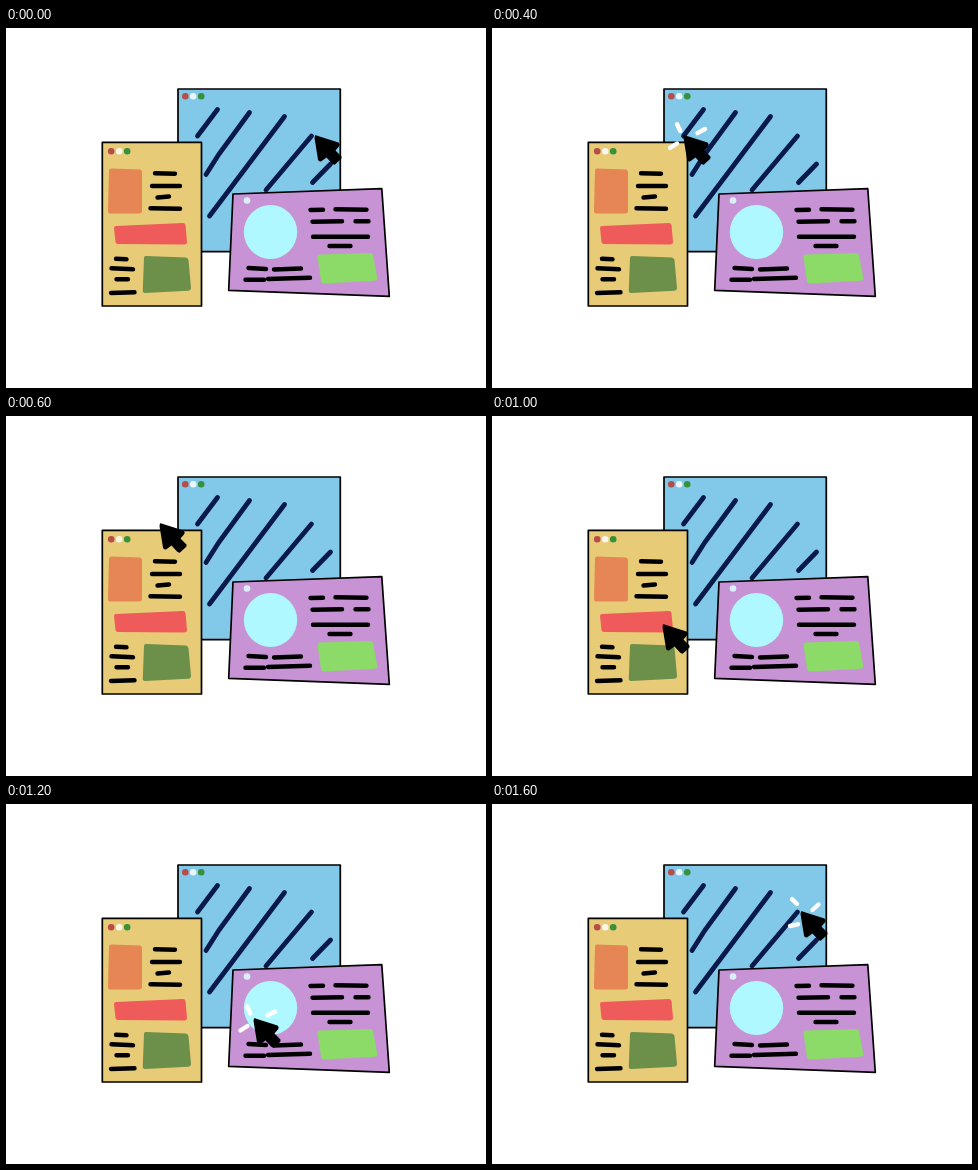
An HTML page that plays this animation: 480 by 360 pixels, repeating every 1.8 s.

```html
<!DOCTYPE html>
<html lang="en">
<head>
<meta charset="utf-8">
<title>Clicking through windows</title>
<style>
  html, body { margin: 0; width: 100%; height: 100%; overflow: hidden; background: #fff; }
  svg { display: block; width: 100vw; height: 100vh; }
  .frame { stroke: #000; stroke-width: 1.7; stroke-linejoin: round; }
  .ink { fill: none; stroke: #000; stroke-width: 4.4; stroke-linecap: round; }
  .glare { stroke: #08194a; stroke-width: 4.8; }
  .click { stroke: #fff; opacity: 0; animation: click 1.8s step-end infinite; }
  .cursor { animation: hop 1.8s step-end infinite; }

  @keyframes hop {
    0%, 88.88% { transform: translate(308px, 107px); }
    11.11% { transform: translate(248px, 107px); }
    22.22% { transform: translate(191px, 107px); }
    33.33% { transform: translate(153px, 107px); }
    44.44% { transform: translate(139px, 151px); }
    55.55% { transform: translate(170px, 208px); }
    66.66% { transform: translate(247px, 214px); }
    77.77% { transform: translate(289px, 180px); }
    100% { transform: translate(308px, 107px); }
  }
  @keyframes click {
    0% { opacity: 1; }
    11.11%, 100% { opacity: 0; }
  }
</style>
</head>
<body>
<svg viewBox="0 0 480 360">
  <g id="blue">
    <path class="frame" fill="#82c8e8" d="M172 61H334.3V223.7H172Z"/>
    <circle cx="179.3" cy="68.3" r="3.3" fill="#b84c48"/>
    <circle cx="187.2" cy="68.3" r="3.3" fill="#e8f7ff"/>
    <circle cx="195.2" cy="68.3" r="3.3" fill="#37913a"/>
    <path class="ink glare" d="M211.5 81.5L191.5 108M243.5 84.5L213 126L200 146.5M278.5 88.5L203.5 188M305.5 108L260 162M324.5 136L306.5 154.5"/>
  </g>

  <g id="yellow">
    <path class="frame" fill="#e7cb77" d="M96.3 114.3H195.5V278H96.3Z"/>
    <circle cx="105.2" cy="123.3" r="3.3" fill="#b84c48"/>
    <circle cx="113.2" cy="123.3" r="3.3" fill="#fbf6ea"/>
    <circle cx="121.2" cy="123.3" r="3.3" fill="#37913a"/>
    <path fill="#e58654" d="M105 140.5L134 141.5Q136 142 136 144V183Q136 185.5 133 185.5L104 185.5Q102 185.5 102 183L103 143Q103 140.5 105 140.5Z"/>
    <path fill="#ef5a5a" d="M110 198L177 195Q179 195 179.500 197L181 214Q181 216.500 178 216.500L112 216Q110 216 109.500 214L108 200Q108 198 110 198Z"/>
    <path fill="#6c8f4a" d="M140 228L180 229.500Q182 230 182.500 232L185 260Q185 262.500 182 262.800L139 265Q136.500 265 136.800 262L138 230Q138 228 140 228Z"/>
    <path class="ink" d="M149 145.300L169 145.700M146 158H174M151.500 169.500L163 168.500M144.500 180.300L174 180.700M110 230.800L120.500 231.300M105.500 240.300L127 241.300M110.500 251.300H122M105 265L128.500 264.300"/>
  </g>

  <g id="purple">
    <path class="frame" fill="#c793d5" d="M227 166L375.800 160.700L383.300 268.300L222.700 262.300Z"/>
    <circle cx="241" cy="172.500" r="3.300" fill="#d9f0fa"/>
    <ellipse cx="264.500" cy="204" rx="26.700" ry="27" fill="#aff8ff"/>
    <path fill="#8cda68" d="M314 226.500L364 225Q366.500 225 367 227L371.300 250Q371.300 252.500 369 252.700L318 255.500Q315.500 255.500 315 253L311.500 229Q311.500 226.500 314 226.500Z"/>
    <path class="ink" d="M304.500 182L317 181.700M329.500 181.200L360.500 181.800M306.500 193.800L336 193.200M349.500 193.200H362.500M307 208.800H362M323.500 218H344.500M242.500 240L260 241M268 241.500L295 240.500M239.500 251.800H258M262 251L304 249.800"/>
  </g>

  <path class="ink click" style="animation-delay:-1.4s" d="M185 96.200L188.300 103M205.500 105.200L213 101M178 119.800L185 115.500"/>
  <path class="ink click" style="animation-delay:-1s" d="M132.500 144.500L136 149.500M150 150.500L157 145.500M125.500 162L133 159.500"/>
  <path class="ink click" style="animation-delay:-.6s" d="M241 202.500L244.300 209.500M261.500 211.500L269 207.500M234.500 226.500L241.500 222"/>
  <path class="ink click" style="animation-delay:-.2s" d="M300 95.200L305 100M320.500 106L326.500 100.500M298 122L306 120.300"/>

  <path class="cursor" d="M1 .5Q2 0 4 1L24.500 7.500Q26.500 9 25.300 11L21.500 15.500L27.500 21.500Q28 23.500 26.500 24.500L21 29.500Q19.500 30 18 28.500L12.500 22.500L7 26.500Q4.500 27 4 24.500L.500 3Z"/>
</svg>
</body>
</html>
```
